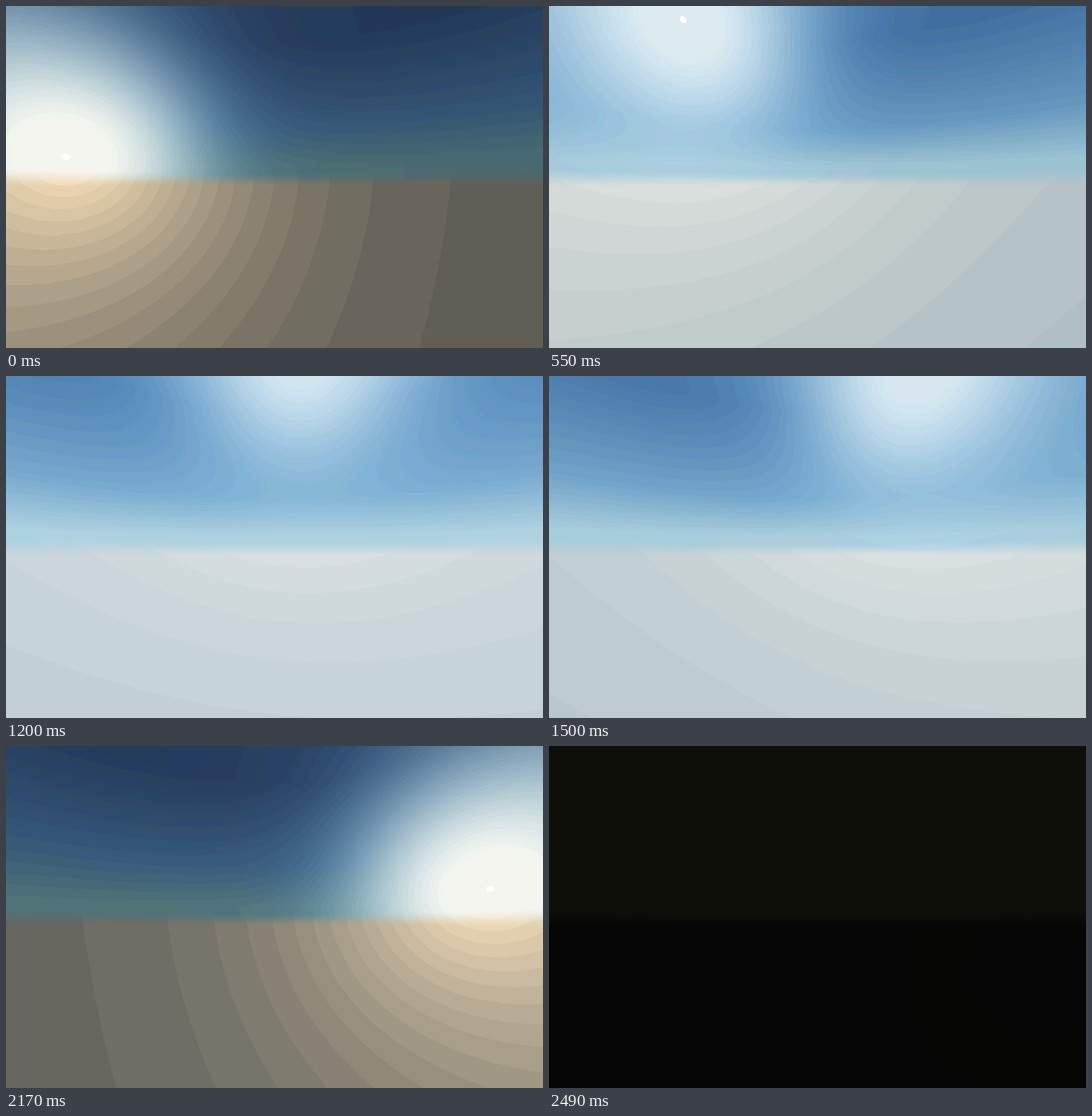
An HTML page with a canvas that plays this animation: 571 px wide and 364 px high, repeating every 2.59 s.

```html
<!DOCTYPE html>
<html lang="en">
<head>
<meta charset="utf-8">
<title>Day cycle</title>
<style>
html, body { margin: 0; width: 100%; height: 100%; overflow: hidden; background: #050505; }
canvas { display: block; width: 100%; height: 100%; }
</style>
</head>
<body>
<canvas id="stage" width="571" height="364"></canvas>
<script>
const W = 571, H = 364, LOOP = 2590;
const HORIZON = 188, FOCAL = 260, ORBIT = 228;
const ctx = document.getElementById('stage').getContext('2d');

// The picture is held between these times.
const STEPS = [0, 80, 260, 400, 550, 700, 850, 1020, 1200, 1350, 1500, 1670, 1850, 2000, 2170, 2350, 2490];

// [time, sun angle in degrees]
const ARC = [[0, 7.05], [260, 27.7], [850, 72.6], [1500, 117.4], [1850, 146.4], [2170, 170.8], [2490, 195]];

// Colours by sun height: sky from zenith to horizon, glow, ground near and far from the sun.
const MOODS = [
  { height: -0.26, top: [15, 14, 11], mid: [15, 14, 11], low: [15, 14, 11], glow: [15, 14, 11],
    near: [5, 5, 5], far: [5, 5, 5], spread: [32] },
  { height: 0.12, top: [33, 55, 86], mid: [51, 85, 117], low: [72, 106, 112], glow: [247, 247, 239],
    near: [258, 233, 190], far: [88, 86, 80], spread: [32] },
  { height: 0.465, top: [48, 86, 131], mid: [74, 122, 164], low: [130, 173, 190], glow: [236, 243, 246],
    near: [270, 255, 241], far: [143, 161, 163], spread: [45] },
  { height: 0.95, top: [71, 120, 171], mid: [116, 167, 205], low: [172, 208, 224], glow: [212, 230, 240],
    near: [266, 265, 254], far: [181, 197, 206], spread: [45] }
];
const HALO = [21.5, 24, 26.5];
const DEG = 180 / Math.PI;

const clamp = (v, a = 0, b = 1) => Math.min(b, Math.max(a, v));
const mix = (a, b, k) => a + (b - a) * k;
const smooth = (a, b, v) => { const k = clamp((v - a) / (b - a)); return k * k * (3 - 2 * k); };
const snap = (v, size) => Math.round(v / size) * size;

function sunAngle(t) {
  let i = 1;
  while (i < ARC.length - 1 && t > ARC[i][0]) i++;
  const [t0, a0] = ARC[i - 1], [t1, a1] = ARC[i];
  return mix(a0, a1, clamp((t - t0) / (t1 - t0))) / DEG;
}

function moodAt(height) {
  let i = 1;
  while (i < MOODS.length - 1 && height > MOODS[i].height) i++;
  const a = MOODS[i - 1], b = MOODS[i];
  const k = clamp((height - a.height) / (b.height - a.height));
  const mood = {};
  for (const key in a) {
    if (key !== 'height') mood[key] = a[key].map((v, c) => mix(v, b[key][c], k));
  }
  return mood;
}

function render(t) {
  const angle = sunAngle(t);
  const mood = moodAt(Math.sin(angle));
  const sx = 4 - ORBIT * Math.cos(angle), sy = ORBIT * Math.sin(angle);
  const sunLength = Math.hypot(sx, sy, FOCAL);
  const image = ctx.createImageData(W, H), data = image.data;

  for (let y = 0, p = 0; y < H; y++) {
    const vy = HORIZON - y;
    for (let x = 0; x < W; x++, p += 4) {
      const vx = x - W / 2;
      const length = Math.sqrt(vx * vx + vy * vy + FOCAL * FOCAL);
      const rise = vy / length;
      const cos = Math.min(1, (vx * sx + vy * sy + FOCAL * FOCAL) / (length * sunLength));
      const gap = Math.acos(cos) * DEG;
      const disc = cos > 0.999955 && rise > 0;
      const air = smooth(-0.015, 0.045, rise);
      const lit = air < 1 ? snap(Math.exp(-Math.pow(gap / mood.spread[0], 1.1)), 0.05) : 0;
      const wide = 0.05 * Math.max(0, cos) ** 2;

      for (let c = 0; c < 3; c++) {
        let v = 0;
        if (air > 0) {
          const base = rise > 0.22
            ? mix(mood.mid[c], mood.top[c], clamp((rise - 0.22) / 0.28))
            : mix(mood.low[c], mood.mid[c], clamp((rise - 0.07) / 0.15));
          const halo = Math.min(1, Math.exp(-Math.pow(gap / HALO[c], 2.2)) + wide);
          v = snap(mix(base, mood.glow[c], halo), 5);
        }
        if (air < 1) v = mix(mix(mood.far[c], mood.near[c], lit), v, air);
        data[p + c] = disc ? 255 : v;
      }
      data[p + 3] = 255;
    }
  }
  return image;
}

const cache = [];
let shown = -1;

function draw(now) {
  const t = now % LOOP;
  let i = STEPS.length - 1;
  while (STEPS[i] > t) i--;
  if (i !== shown) {
    cache[i] = cache[i] || render(STEPS[i]);
    ctx.putImageData(cache[i], 0, 0);
    shown = i;
  }
}

const start = performance.now();
function tick() {
  draw(performance.now() - start);
  requestAnimationFrame(tick);
}
tick();
</script>
</body>
</html>
```
